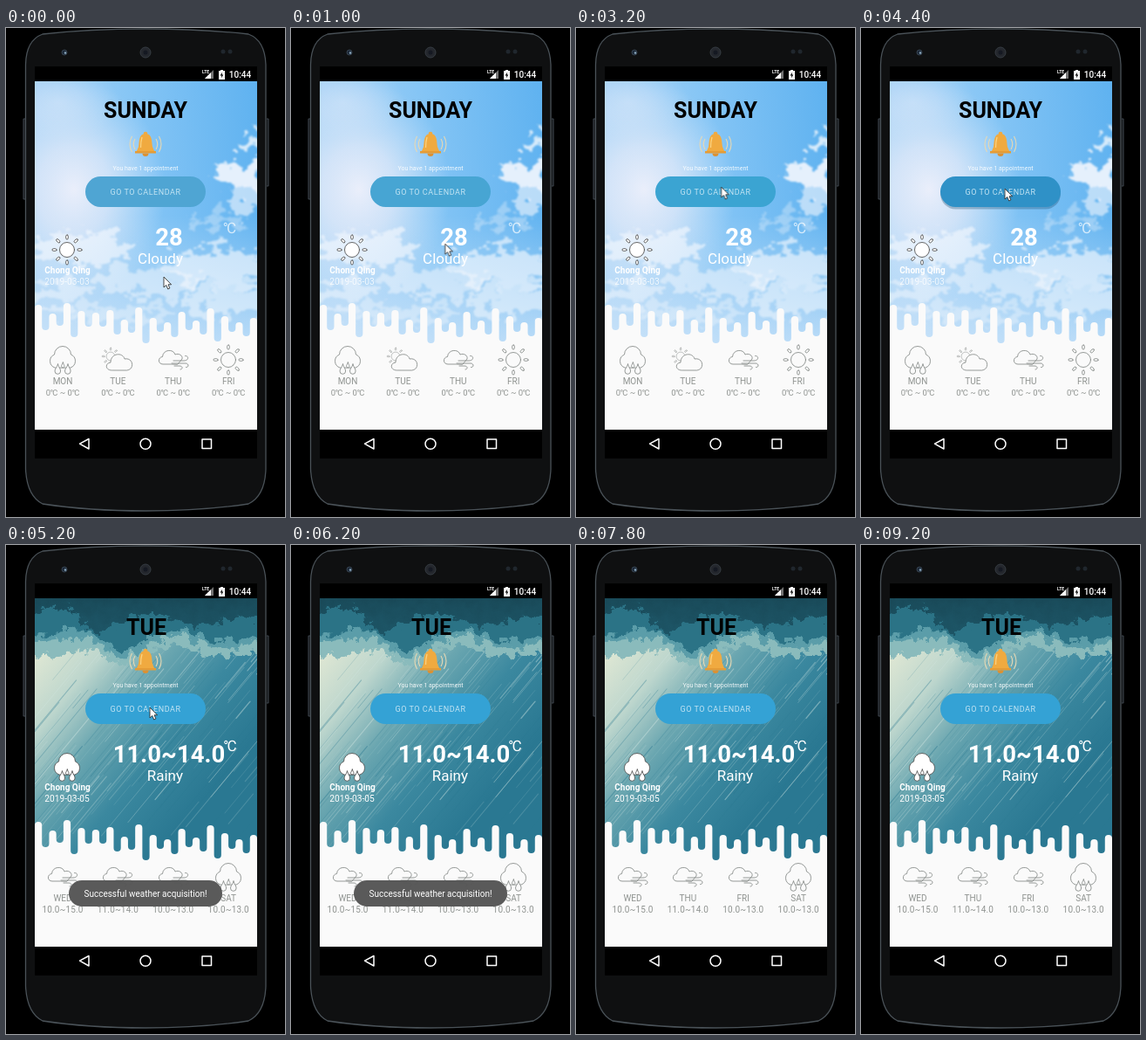
These frames come from a looping animation (320 by 560 pixels, 9.4 s). An HTML page:

```html
<!DOCTYPE html>
<html lang="en">
<head>
<meta charset="utf-8">
<title>Weather reminder</title>
<style>
  html, body { margin: 0; width: 100%; height: 100%; overflow: hidden; background: #000; }
  svg { display: block; width: 320px; height: 560px; font-family: Roboto, "Noto Sans CJK SC", "Noto Sans CJK", sans-serif; }
  text { text-anchor: middle; }
  .title { font: 700 25px Roboto, sans-serif; }
  .temp { font-size: 27.5px; font-weight: 700; }
  .sky { font-size: 17px; text-anchor: end; }
  .city { font-size: 10px; font-weight: 700; }
  .date { font-size: 10.2px; }
  .days { font-size: 10px; fill: #8f9390; }
  .zero { font-size: 9.5px; }
  .range { letter-spacing: .15px; }
  .ink { fill: #fff; stroke: #555; stroke-width: .9; stroke-linecap: round; stroke-linejoin: round; }
  .thin { fill: #fafafa; stroke: #7d827f; stroke-width: .8; stroke-linecap: round; stroke-linejoin: round; }
  .anim { animation: 9400ms linear infinite; }
  .sunday { animation-name: sunday; animation-timing-function: step-end; }
  .tuesday { animation-name: tuesday; animation-timing-function: step-end; }
  .toast { animation-name: toast; }
  .cursor { animation-name: cursor; }
  .button { animation-name: press; }
  .shade { animation-name: shade; }
  @keyframes sunday { 0% { visibility: visible } 51.06%, 100% { visibility: hidden } }
  @keyframes tuesday { 0% { visibility: hidden } 51.06%, 100% { visibility: visible } }
  @keyframes toast {
    0%, 51.5% { opacity: 0 }
    53.5%, 70% { opacity: 1 }
    74.6%, 100% { opacity: 0 }
  }
  @keyframes cursor {
    0%, 4% { transform: translate(181px, 285px); opacity: 1; animation-timing-function: ease-in-out }
    20%, 25% { transform: translate(169px, 179px) }
    40%, 47% { transform: translate(165px, 184px) }
    55%, 59.5% { transform: translate(165px, 186px); opacity: 1 }
    59.6%, 100% { transform: translate(165px, 186px); opacity: 0 }
  }
  @keyframes press {
    0%, 4% { fill: #4fa5d3 }
    20%, 44% { fill: #3ba4d2 }
    46.5%, 50% { fill: #2f91c7 }
    53%, 100% { fill: #34a2d5 }
  }
  @keyframes shade {
    0%, 44% { opacity: 0 }
    46.5%, 50% { opacity: .3 }
    53%, 100% { opacity: 0 }
  }
</style>
</head>
<body>
<svg viewBox="0 0 320 560">
  <defs>
    <clipPath id="screen"><rect x="33" y="61" width="255" height="399"/></clipPath>
    <linearGradient id="blue" x1="0" y1=".1" x2="1" y2="0">
      <stop offset="0" stop-color="#a6d2f6"/>
      <stop offset=".45" stop-color="#85c5f5"/>
      <stop offset="1" stop-color="#5fb2f0"/>
    </linearGradient>
    <linearGradient id="haze" x1="0" y1="0" x2="0" y2="1">
      <stop offset="0" stop-color="#cfe5f9" stop-opacity="0"/>
      <stop offset="1" stop-color="#cfe5f9" stop-opacity=".8"/>
    </linearGradient>
    <radialGradient id="glow">
      <stop offset="0" stop-color="#eef0fb" stop-opacity=".95"/>
      <stop offset=".4" stop-color="#e2eaf9" stop-opacity=".75"/>
      <stop offset="1" stop-color="#d6e8fa" stop-opacity="0"/>
    </radialGradient>
    <linearGradient id="storm" gradientUnits="userSpaceOnUse" x1="34" y1="130" x2="226" y2="290">
      <stop offset="0" stop-color="#dde6d3"/>
      <stop offset=".22" stop-color="#bdd6cd"/>
      <stop offset=".45" stop-color="#6aa6b0"/>
      <stop offset=".7" stop-color="#3b889f"/>
      <stop offset="1" stop-color="#2a7892"/>
    </linearGradient>
    <linearGradient id="dusk" x1="0" y1="0" x2="0" y2="1">
      <stop offset="0" stop-color="#174452"/>
      <stop offset="1" stop-color="#1d5566"/>
    </linearGradient>
    <filter id="puff" x="-20%" y="-20%" width="140%" height="140%" color-interpolation-filters="sRGB">
      <feTurbulence type="fractalNoise" baseFrequency=".05 .075" numOctaves="5" seed="8"/>
      <feDisplacementMap in="SourceGraphic" scale="55" xChannelSelector="R" yChannelSelector="G"/>
      <feGaussianBlur stdDeviation="1.1"/>
    </filter>
    <filter id="ragged" x="-20%" y="-40%" width="140%" height="180%" color-interpolation-filters="sRGB">
      <feTurbulence type="fractalNoise" baseFrequency=".1" numOctaves="4" seed="5"/>
      <feDisplacementMap in="SourceGraphic" scale="24" xChannelSelector="R" yChannelSelector="G"/>
      <feGaussianBlur stdDeviation=".5"/>
    </filter>

    <!-- icons are centred on the origin -->
    <g id="rain">
      <path d="M-9 8A8 8 0 0 1-9.500-7A9.500 9.500 0 0 1 9.500-7A8 8 0 0 1 9 8Z"/>
      <path id="drop" d="M-5.500 4C-6.500 8-9 9-9 12A3.300 3.300 0 0 0-2.400 12C-2.400 9-4.500 8-5.500 4Z"/>
      <use href="#drop" x="11.500"/>
      <path d="M.3 2C-.2 4-1.500 5-1.500 6.500A1.800 1.800 0 0 0 2 6.500C2 5 .8 4 .3 2Z"/>
    </g>
    <g id="ray">
      <rect x="-1.300" y="-17" width="2.600" height="5" rx="1.300"/>
      <rect x="-1.300" y="12" width="2.600" height="5" rx="1.300"/>
    </g>
    <g id="sun">
      <circle r="8.500"/>
      <use href="#ray"/>
      <use href="#ray" transform="rotate(45)"/>
      <use href="#ray" transform="rotate(90)"/>
      <use href="#ray" transform="rotate(135)"/>
    </g>
    <g id="partly">
      <use href="#sun" transform="translate(-8 -4) scale(.58)"/>
      <path d="M-7 12C-14 12-15 4-8 3C-8-8 6-9 8-1C18-3 20 11 11 12Z"/>
    </g>
    <g id="wind">
      <path d="M-3 5H-12C-18 5-18-3-12.500-3.500C-12-12 0-13 2-6C6-8 11-5 10-1L5 5Z"/>
      <path fill="none" d="M0 1H12C18 1 18-5 13.500-4.500M-2 4H14C18 4 18 9 14.500 8.500M1 7H7C11 7 11 11 8 11"/>
    </g>
  </defs>

  <rect width="320" height="560"/>

  <!-- phone shell -->
  <path d="M22 104H20V196H22M299 104H301V181H299" fill="#181b1e" stroke="#3f474e"/>
  <path d="M22.500 42Q23 14 42 7Q95 1 160 1T278 7Q297 14 298 42V505Q297 536 278 545Q225 553 160 553T42 545Q24 536 22.500 505Z" fill="#0f1011" stroke="#4a5258" stroke-width="1.300"/>
  <circle cx="160" cy="28" r="6" fill="#24272d" stroke="#373d44"/>
  <circle cx="160" cy="28" r="2.500" fill="#151922"/>
  <circle cx="67" cy="28" r="3" fill="#1c2838" stroke="#36424e"/>
  <circle cx="68" cy="28.500" r="1.200" fill="#8eabc0"/>
  <g fill="#20272e"><circle cx="249" cy="27" r="2.500"/><circle cx="257" cy="27" r="2.500"/></g>
  <rect x="33" y="44" width="255" height="449"/>

  <!-- status bar -->
  <g fill="#fff">
    <text x="229" y="52" font-size="5" font-weight="700">LTE</text>
    <path d="M238 48V58H228Z" opacity=".45"/>
    <path d="M235 51V58H228Z"/>
    <path d="M246 48H249V49H251V59H244V49H246Z"/>
    <path d="M248.200 50.500L245.600 54.500H247.400L246.800 57.500L249.400 53.500H247.700Z" fill="#000"/>
    <text x="268.500" y="57" font-size="10" font-weight="500">10:44</text>
  </g>

  <g clip-path="url(#screen)">
    <g class="anim sunday">
      <rect x="33" y="61" width="255" height="301" fill="url(#blue)"/>
      <rect x="33" y="215" width="255" height="147" fill="url(#haze)"/>
      <ellipse cx="78" cy="185" rx="105" ry="125" fill="url(#glow)"/>
      <ellipse cx="60" cy="85" rx="70" ry="45" fill="url(#glow)" opacity=".4"/>
      <g filter="url(#puff)" fill="#f3f7fd">
        <ellipse cx="287" cy="130" rx="16" ry="9" opacity=".8"/>
        <ellipse cx="272" cy="167" rx="32" ry="14" opacity=".9"/>
        <ellipse cx="287" cy="195" rx="30" ry="20" opacity=".6"/>
        <ellipse cx="245" cy="220" rx="30" ry="8" opacity=".35"/>
        <ellipse cx="245" cy="274" rx="62" ry="22" opacity=".65"/>
        <ellipse cx="265" cy="313" rx="60" ry="18" opacity=".55"/>
        <ellipse cx="160" cy="290" rx="62" ry="16" opacity=".5"/>
        <ellipse cx="85" cy="252" rx="60" ry="17" opacity=".65"/>
        <ellipse cx="52" cy="305" rx="44" ry="14" opacity=".5"/>
        <ellipse cx="130" cy="327" rx="68" ry="10" opacity=".4"/>
      </g>
    </g>
    <g class="anim tuesday">
      <rect x="33" y="61" width="255" height="301" fill="url(#storm)"/>
      <g id="streaks" stroke-linecap="round"></g>
      <g filter="url(#ragged)">
        <path d="M10 45H315V127Q280 121 260 126T215 120T160 127T115 130T75 123T10 128Z" fill="#8abbbc"/>
        <path d="M10 45H315V117Q280 112 260 116T215 109T160 118T115 121T75 107T10 112Z" fill="#5b9da9"/>
        <path d="M10 45H315V107Q280 103 260 108T215 101T160 110T115 113T75 98T10 103Z" fill="#2b7386"/>
        <path d="M10 40H315V88Q270 81 245 89T190 84T130 90T85 84T10 88Z" fill="url(#dusk)"/>
      </g>
    </g>

    <path id="drips" fill="#fafafa"/>

    <g class="anim sunday">
      <text class="title" x="160" y="103">SUNDAY</text>
      <g fill="#fff">
        <text class="temp" x="187" y="249">28</text>
        <text x="257" y="235" font-size="17" opacity=".7">℃</text>
        <text class="sky" x="203" y="270">Cloudy</text>
        <text class="city" x="70.500" y="281">Chong Qing</text>
        <text class="date" x="70" y="294" opacity=".8">2019-03-03</text>
      </g>
      <use class="ink" href="#sun" x="70" y="254"/>
      <g class="thin">
        <use href="#rain" x="65" y="381"/>
        <use href="#partly" x="128" y="380"/>
        <use href="#wind" x="192" y="380"/>
        <use href="#sun" x="255" y="380"/>
      </g>
      <g class="days" id="weekA"></g>
    </g>
    <g class="anim tuesday">
      <text class="title" x="161" y="103">TUE</text>
      <g fill="#fff">
        <text class="temp" x="187" y="249">11.0~14.0</text>
        <text x="257.500" y="236" font-size="17">℃</text>
        <text class="sky" x="203" y="270">Rainy</text>
        <text class="city" x="70.500" y="281">Chong Qing</text>
        <text class="date" x="70" y="294">2019-03-05</text>
      </g>
      <use class="ink" href="#rain" x="70" y="255"/>
      <g class="thin">
        <use href="#wind" x="65" y="380"/>
        <use href="#wind" x="128" y="380"/>
        <use href="#wind" x="192" y="380"/>
        <use href="#rain" x="255" y="381"/>
      </g>
      <g class="days" id="weekB"></g>
    </g>

    <!-- bell -->
    <g fill="#f0aa40">
      <circle cx="160" cy="121" r="2.300"/>
      <path d="M160 121C168 121 167 130 168 136Q169 140 172 143H148Q151 140 152 136C153 130 152 121 160 121Z"/>
      <path d="M156.500 143.500A3.500 3.500 0 0 0 163.500 143.500Z" fill="#dc9132"/>
      <path d="M148 141H172V143.500H148Z" fill="#e49c37"/>
      <path d="M156 125Q154.500 130 154.500 137" fill="none" stroke="#fbd27f" stroke-width="1.300"/>
    </g>
    <path d="M148 127Q144.500 133 148 139M144.500 124Q139.500 133 144.500 142M172 127Q175.500 133 172 139M175.500 124Q180.500 133 175.500 142" fill="none" stroke="#e6d8b4" stroke-width="1.100"/>

    <text x="160" y="163" font-size="7" fill="#fff" opacity=".9">You have 1 appointment</text>
    <rect class="anim shade" x="91" y="172.500" width="138" height="35" rx="17.500" fill="#114465" opacity="0"/>
    <rect class="anim button" x="91" y="170" width="138" height="35" rx="17.500" fill="#34a2d5"/>
    <text x="160" y="191" font-size="9" letter-spacing=".55" fill="#c3e4f3">GO TO CALENDAR</text>

    <g class="anim toast">
      <rect x="72" y="384" width="176" height="30" rx="15" fill="#555" opacity=".97"/>
      <text x="160" y="403" font-size="10" fill="#fff">Successful weather acquisition!</text>
    </g>
  </g>

  <!-- navigation bar -->
  <g fill="none" stroke="#fff" stroke-width="1.500" stroke-linejoin="round">
    <path d="M95 470.500V482L84.500 476.200Z"/>
    <circle cx="160" cy="476.200" r="6"/>
    <rect x="225" y="471" width="10.500" height="10.500"/>
  </g>

  <g class="anim cursor">
    <path d="M0 0V12L2.800 9.500L4.700 14L6.900 13L5 8.800H8.600Z" fill="#fff" stroke="#333" stroke-width=".9"/>
  </g>
</svg>
<script>
  const $ = id => document.getElementById(id);
  const svg = (tag, attrs, parent) => {
    const el = document.createElementNS('http://www.w3.org/2000/svg', tag);
    for (const key in attrs) el.setAttribute(key, attrs[key]);
    return parent.appendChild(el);
  };

  // alternating white fingers and hanging drips, left to right
  const levels = [321, 342, 331, 337, 319, 350, 328, 338, 330, 338, 327, 347, 338, 345, 324, 357,
    336, 344, 341, 350, 329, 342, 339, 347, 325, 355, 334, 344, 341, 349, 336];
  const step = 255 / levels.length;
  const edge = levels.map((y, i) =>
    `L${33 + i * step} ${y}a${step / 2} ${step / 2} 0 0 ${1 - i % 2} ${step} 0`);
  $('drips').setAttribute('d', `M33 460${edge.join('')}V460Z`);

  let seed = 29;
  const random = () => (seed = seed * 16807 % 2147483647) / 2147483647;
  for (let i = 0; i < 150; i++) {
    const x = 45 + random() * 330, y = 85 + random() * 220, length = 25 + random() ** 2 * 150;
    svg('line', {
      x1: x, y1: y, x2: x - length * .64, y2: y + length * .77,
      stroke: i % 3 ? '#d5e8e4' : '#2a7890',
      'stroke-width': .4 + random() * .8, opacity: .12 + random() * .35
    }, $('streaks'));
  }

  const week = (id, days, temps, style) => days.forEach((day, i) => {
    const x = 65 + i * 63.4;
    svg('text', { x, y: 407.5 }, $(id)).textContent = day;
    svg('text', { x, y: 420.5, class: style }, $(id)).textContent = temps[i];
  });
  week('weekA', ['MON', 'TUE', 'THU', 'FRI'], Array(4).fill('0℃ ~ 0℃'), 'zero');
  week('weekB', ['WED', 'THU', 'FRI', 'SAT'], ['10.0~15.0', '11.0~14.0', '10.0~13.0', '10.0~13.0'], 'range');
</script>
</body>
</html>
```
